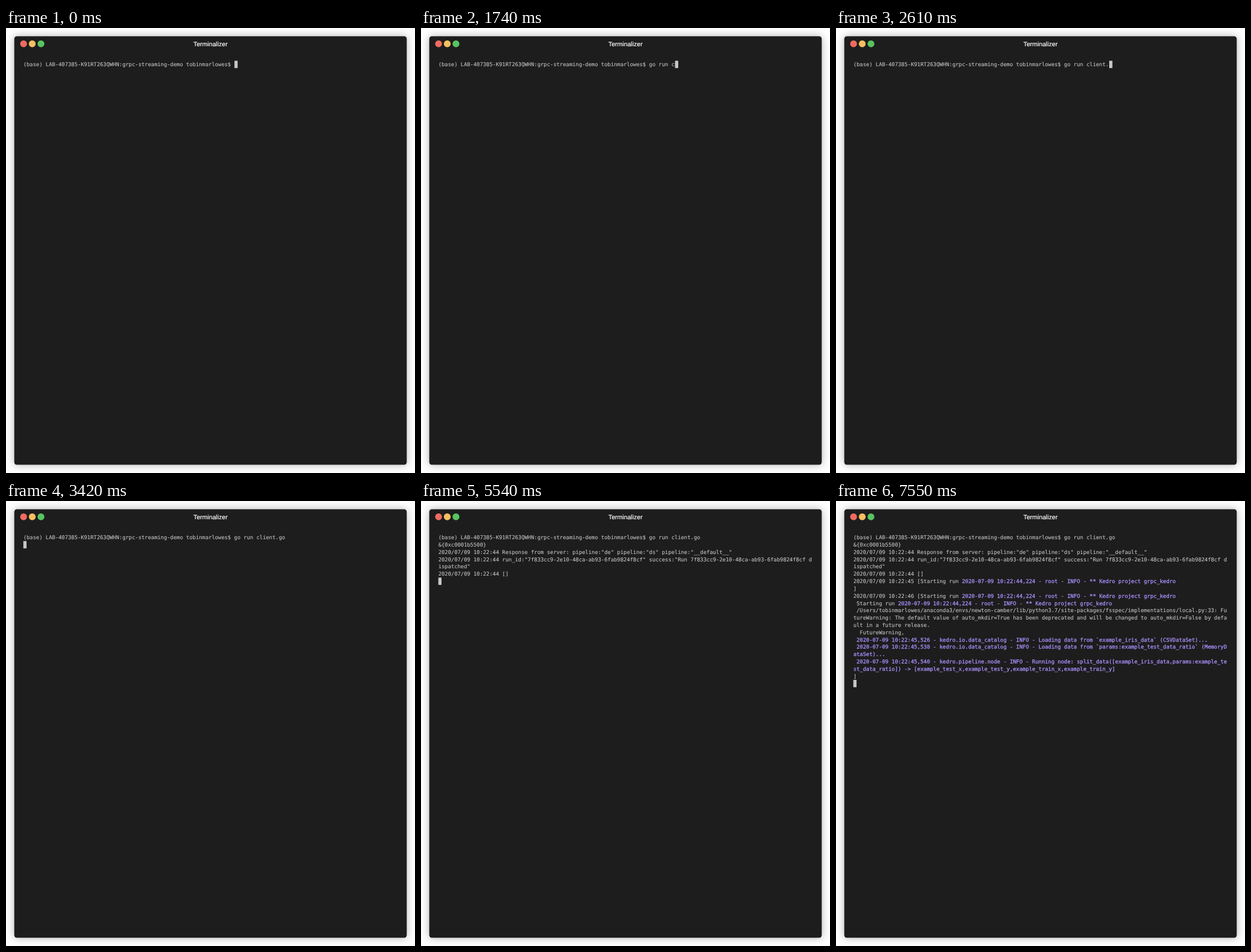
Write an HTML page that moves like this. It is 717 px wide and 781 px high and loops after 8000 ms.

```html
<!DOCTYPE html>
<html lang="en">
<head>
<meta charset="utf-8">
<title>Terminal session</title>
<style>
  html, body { margin: 0; width: 717px; height: 781px; overflow: hidden; background: #fff; }
  svg { position: absolute; left: 0; top: 0; display: block; }
  .window { fill: #1d1d1d; filter: drop-shadow(0 0 7.5px rgba(0, 0, 0, .3)); }
  text { white-space: pre; text-rendering: geometricPrecision; }
  .title {
    font: 11.1px "Liberation Sans", Arial, sans-serif; text-anchor: middle;
    fill: #fff; stroke: #fff; stroke-width: .2px;
  }
  #screen {
    font: 9.313px "DejaVu Sans Mono", monospace; font-variant-ligatures: none;
    fill: #c4c4c4; stroke: #c4c4c4; stroke-width: .1px;
  }
  #screen .log { fill: #ab91ff; stroke: #ab91ff; stroke-width: .3px; }
  #cursor { fill: #c7c7c7; }
</style>
</head>
<body>
<svg width="717" height="781" viewBox="0 0 717 781">
  <rect class="window" x="14.5" y="14.5" width="688" height="752" rx="4.5"/>
  <circle cx="30.8" cy="27.8" r="6" fill="#ef6b60"/>
  <circle cx="46" cy="27.8" r="6" fill="#f6bf5f"/>
  <circle cx="61.3" cy="27.8" r="6" fill="#58c461"/>
  <text class="title" x="358.5" y="32">Terminalizer</text>
  <g id="screen"></g>
  <rect id="cursor" width="5.6" height="12.8"/>
</svg>
<script>
const LOOP = 8000, LEFT = 30.4, TOP = 57.5, CELL = 5.607, LINE = 12.825, BASELINE = 9.6;

const prompt = '(base) LAB-407385-K91RT263QWHN:grpc-streaming-demo tobinmarlowes$ ';
const command = 'go run client.go';

// Time of each keystroke of the command
const keys = [500, 570, 740, 890, 1110, 1240, 1490, 1740, 1860, 1960, 2070, 2170, 2330, 2610, 2930, 3010];

// [time, number of finished rows]
const output = [[3420, 1], [5420, 2], [5520, 3], [5540, 6], [6540, 8], [7550, 20]];

// A bar switches between plain and log colour
const rows = [
  prompt,
  '&{0xc0001b5500}',
  '2020/07/09 10:22:44 Response from server: pipeline:"de" pipeline:"ds" pipeline:"__default__"',
  '2020/07/09 10:22:44 run_id:"7f833cc9-2e10-48ca-ab93-6fab9824f8cf" success:"Run 7f833cc9-2e10-48ca-ab93-6fab9824f8cf d',
  'ispatched"',
  '2020/07/09 10:22:44 []',
  '2020/07/09 10:22:45 [Starting run |2020-07-09 10:22:44,224 - root - INFO - ** Kedro project grpc_kedro',
  ']',
  '2020/07/09 10:22:46 [Starting run |2020-07-09 10:22:44,224 - root - INFO - ** Kedro project grpc_kedro',
  ' Starting run |2020-07-09 10:22:44,224 - root - INFO - ** Kedro project grpc_kedro',
  ' /Users/tobinmarlowes/anaconda3/envs/newton-camber/lib/python3.7/site-packages/fsspec/implementations/local.py:33: Fu',
  'tureWarning: The default value of auto_mkdir=True has been deprecated and will be changed to auto_mkdir=False by defa',
  'ult in a future release.',
  '  FutureWarning,',
  '| 2020-07-09 10:22:45,526 - kedro.io.data_catalog - INFO - Loading data from `example_iris_data` (CSVDataSet)...',
  '| 2020-07-09 10:22:45,538 - kedro.io.data_catalog - INFO - Loading data from `params:example_test_data_ratio` (MemoryD',
  '|ataSet)...',
  '| 2020-07-09 10:22:45,540 - kedro.pipeline.node - INFO - Running node: split_data([example_iris_data,params:example_te',
  '|st_data_ratio]) -> [example_test_x,example_test_y,example_train_x,example_train_y]',
  ']'
];

const svgNode = name => document.createElementNS('http://www.w3.org/2000/svg', name);
const screen = document.getElementById('screen');
const cursor = document.getElementById('cursor');

const lines = rows.map((row, i) => {
  const line = svgNode('text');
  line.setAttribute('x', LEFT);
  line.setAttribute('y', TOP + i * LINE + BASELINE);
  row.split('|').forEach((part, k) => {
    if (!part) return;
    const span = svgNode('tspan');
    span.textContent = part;
    if (k % 2) span.setAttribute('class', 'log');
    line.append(span);
  });
  screen.append(line);
  return line;
});

function draw() {
  const t = performance.now() % LOOP;
  const typed = keys.filter(time => time <= t).length;
  const done = output.reduce((n, [time, count]) => time <= t ? count : n, 0);

  lines[0].firstChild.textContent = prompt + command.slice(0, typed);
  lines.forEach((line, i) => {
    line.style.display = i < Math.max(done, 1) ? '' : 'none';
  });
  const column = done ? 0 : prompt.length + typed;
  cursor.setAttribute('x', LEFT + column * CELL);
  cursor.setAttribute('y', TOP + done * LINE);
  requestAnimationFrame(draw);
}
draw();
</script>
</body>
</html>
```
